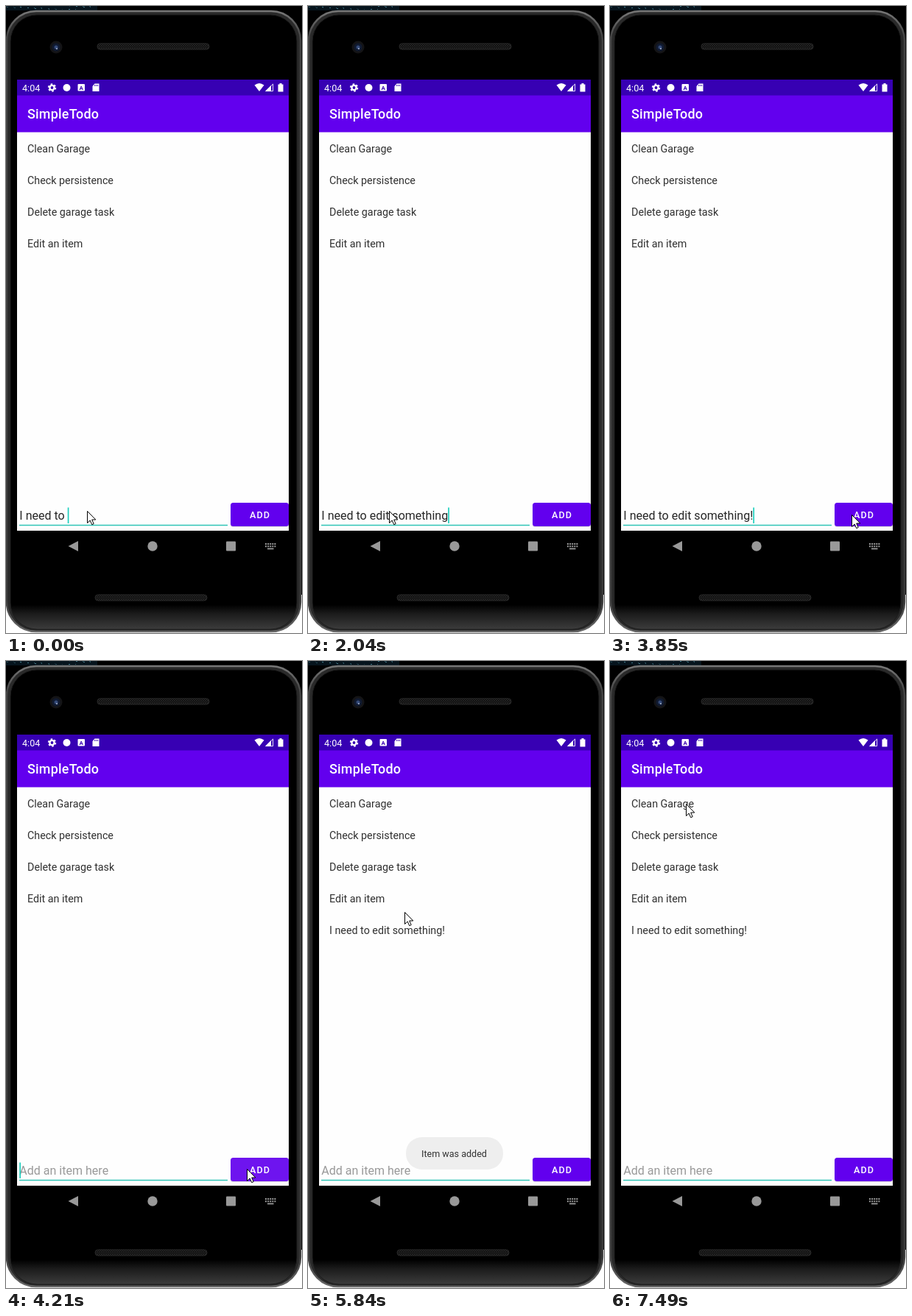
Recreate the animation shown at these times as an HTML page. Size 402x852 px, loop 8000 ms.

```html
<!DOCTYPE html>
<html lang="en">
<head>
<meta charset="utf-8">
<title>Todo list</title>
<style>
  html, body { margin: 0; width: 100%; height: 100%; overflow: hidden; background: #000; }
  svg { display: block; }
  text { font-family: Roboto, sans-serif; white-space: pre; }
  .item { font-size: 14.3px; fill: #303030; }
  .medium { font-weight: 500; fill: #fff; }
</style>
</head>
<body>
<svg width="402" height="852" viewBox="0 0 402 852">
  <defs>
    <linearGradient id="rim" x2="0" y2="1">
      <stop offset="0" stop-color="#777"/>
      <stop offset=".04" stop-color="#444"/>
      <stop offset=".95" stop-color="#3c3c3c"/>
      <stop offset="1" stop-color="#666"/>
    </linearGradient>
    <linearGradient id="chin" x2="0" y2="1">
      <stop offset=".96" stop-color="#000"/>
      <stop offset=".975" stop-color="#1c1c1c"/>
      <stop offset="1" stop-color="#3c3c3c"/>
    </linearGradient>
    <pattern id="mesh" width="3" height="3" patternUnits="userSpaceOnUse">
      <path d="M0 0L3 3M3 0L0 3" stroke="#303030" stroke-width=".6"/>
    </pattern>
    <g id="speaker">
      <rect width="152" height="8" rx="4" fill="#0c0c0c"/>
      <rect width="152" height="8" rx="4" fill="url(#mesh)" stroke="#2a2a2a"/>
    </g>
  </defs>

  <!-- phone -->
  <rect width="402" height="800"/>
  <rect y="800" width="402" height="52" fill="#fff"/>
  <rect width="124" height="6" fill="#06141d"/>
  <g id="specks" fill="#5fa9bd"></g>
  <rect x="1" y="7" width="399" height="843" rx="40" fill="#2a2a2a" stroke="url(#rim)" stroke-width="2.5"/>
  <rect x="6" y="12" width="389" height="835" rx="36" fill="url(#chin)" stroke="#1c1c1c"/>
  <use href="#speaker" x="124" y="51"/>
  <use href="#speaker" x="121" y="800"/>
  <circle cx="68" cy="56" r="8.500" fill="#141416"/>
  <circle cx="68" cy="56" r="5.5" fill="#101a30"/>
  <circle cx="68" cy="56" r="2.5" fill="#344a78"/>
  <circle cx="69" cy="58" r="1" fill="#a9b6d0"/>

  <!-- screen -->
  <rect x="15" y="100" width="369" height="613" fill="#fefefe"/>
  <rect x="15" y="100" width="369" height="71.5" fill="#6200ee"/>
  <rect x="15" y="100" width="369" height="21.5" fill="#3700b3"/>
  <text x="22" y="115.5" font-size="12.6" fill="#fff">4:04</text>
  <g fill="#fff">
    <circle cx="62.5" cy="111" r="3.1" fill="none" stroke="#fff" stroke-width="2.4"/>
    <circle cx="62.5" cy="111" r="4.9" fill="none" stroke="#fff" stroke-width="1.6" stroke-dasharray="2.6 2.53"/>
    <circle cx="82.5" cy="111" r="5"/>
    <rect x="97.5" y="106" width="9.5" height="9.5" rx="1"/>
    <text x="102.2" y="113.6" font-size="8" font-weight="700" text-anchor="middle" fill="#3700b3">A</text>
    <path d="M117.5 109L120.5 105.5H126.5V116H117.5Z"/>
    <path d="M120.6 107V109M122.6 107V109M124.6 107V109" stroke="#3700b3" stroke-width=".9"/>
    <path d="M344 116L337.5 107.5Q344 102.5 350.5 107.5Z"/>
    <path d="M352 116L360 108V116Z"/>
    <path d="M352.8 115.6L362.6 106V115.6Z" fill="none" stroke="#fff" stroke-width=".9"/>
    <path d="M369.5 106.5H371.5V105H374.5V106.5H376.5V116.5H369.5Z"/>
  </g>
  <text class="medium" x="29" y="153" font-size="17.96" letter-spacing=".22">SimpleTodo</text>
  <g id="list"></g>

  <text id="field" x="18.3" y="698" font-size="16.05"></text>
  <rect x="18" y="704.8" width="283" height="1.5" fill="#2fc4b6"/>
  <rect id="caret" y="681.5" width="1.7" height="21.5" fill="#1fcfbe"/>

  <rect x="305" y="676" width="79" height="32" rx="3.5" opacity=".14"/>
  <rect id="button" x="305" y="675" width="79" height="32" rx="3.5"/>
  <text class="medium" x="345" y="696" font-size="12.57" letter-spacing="1.12" text-anchor="middle">ADD</text>

  <g id="toast">
    <rect x="133" y="647" width="132" height="44" rx="21.5" fill="#eee"/>
    <text x="154" y="674" font-size="12.57" fill="#333">Item was added</text>
  </g>

  <!-- navigation bar -->
  <g fill="#999">
    <path d="M84.5 734L98 727V741Z"/>
    <circle cx="199" cy="734" r="6.7"/>
    <rect x="299" y="727.5" width="13" height="13" rx="1"/>
    <path d="M352 731H366.5M352 734.2H366.5" stroke="#999" stroke-width="2" stroke-dasharray="2 1.1"/>
    <rect x="355" y="736.6" width="8.5" height="1.8"/>
  </g>
  <path id="pointer" d="M.5 .5V16.5L4.2 13L6.7 18.7L9.2 17.6L6.7 12H11.8Z" fill="#fff" stroke="#000"/>
</svg>
<script>
const LOOP = 8000, CLEARED = 4090, ADDED = 4330, RELEASED = 4450, TOAST_END = 6610;
const BLINK = 485, FADE = 480, REFRESH = 124.5, FIRST_MOVE = 3460;

const linear = u => u, easeIn = u => u * u, easeOut = u => u * (2 - u);
const clamp = value => Math.max(0, Math.min(1, value));

const prefix = "I need to ", typed = "edit something!";
const bursts = [
  { text: "edit ", start: 140, pace: 185 },
  { text: "something", start: 1130, pace: 113.5 },
  { text: "!", start: 2440, pace: 0 }
];
const keyTimes = bursts.flatMap(({ text, start, pace }) => [...text].map((_, i) => start + i * pace));

// Pointer stops, each with the easing used to reach it.
const stops = [
  { time: 3340, x: 110, y: 686 },
  { time: 3730, x: 328, y: 691, ease: easeOut },
  { time: RELEASED, x: 327, y: 690, ease: linear },
  { time: 5080, x: 227, y: 536, ease: easeIn },
  { time: 5330, x: 162, y: 415, ease: linear },
  { time: 5960, x: 130, y: 337, ease: easeOut },
  { time: 6440, x: 125, y: 269, ease: easeOut },
  { time: 7190, x: 103, y: 194, ease: linear }
];

const $ = id => document.getElementById(id);
const field = $("field"), caret = $("caret"), button = $("button"), toast = $("toast"), pointer = $("pointer");

function add(parent, name, attributes, text = "") {
  const node = document.createElementNS("http://www.w3.org/2000/svg", name);
  for (const key in attributes) node.setAttribute(key, attributes[key]);
  node.textContent = text;
  parent.append(node);
  return node;
}

const rows = ["Clean Garage", "Check persistence", "Delete garage task", "Edit an item", prefix + typed]
  .map((label, i) => add($("list"), "text", { class: "item", x: 29, y: 198.7 + 43.05 * i }, label));

for (let i = 0; i < 24; i++) {
  add($("specks"), "rect", { x: i * 47 % 122, y: i * 7 % 5, width: 1 + i % 2, height: 1, opacity: .2 + i % 4 * .15 });
}

function pointerAt(t) {
  const next = stops.findIndex(stop => stop.time > t);
  if (next === 0) return stops[0];
  if (next < 0) return stops[stops.length - 1];
  const from = stops[next - 1], to = stops[next];
  const u = to.ease((t - from.time) / (to.time - from.time));
  return { x: from.x + (to.x - from.x) * u, y: from.y + (to.y - from.y) * u };
}

function draw(now) {
  const t = now % LOOP;
  const refreshed = FIRST_MOVE + Math.floor((t - FIRST_MOVE) / REFRESH) * REFRESH;
  const cleared = t >= CLEARED;
  const keys = keyTimes.filter(time => time <= t);
  const lastEdit = cleared ? CLEARED : keys.length ? keys[keys.length - 1] : 0;

  field.textContent = cleared ? "Add an item here" : prefix + typed.slice(0, keys.length);
  field.setAttribute("fill", cleared ? "#999" : "#262626");
  caret.setAttribute("x", 18.3 + (cleared ? 0 : field.getComputedTextLength()));
  caret.style.opacity = Math.floor((t - lastEdit) / BLINK) % 2 ? 0 : 1;
  button.setAttribute("fill", t >= CLEARED && t < RELEASED ? "#6e14ef" : "#6200ee");
  rows[4].style.opacity = t >= ADDED ? 1 : 0;
  toast.style.opacity = clamp(Math.min(refreshed - RELEASED, TOAST_END - t) / FADE);

  const { x, y } = pointerAt(t < FIRST_MOVE ? 0 : refreshed);
  pointer.setAttribute("transform", `translate(${Math.round(x)} ${Math.round(y)})`);
  requestAnimationFrame(draw);
}
draw(0);
</script>
</body>
</html>
```
